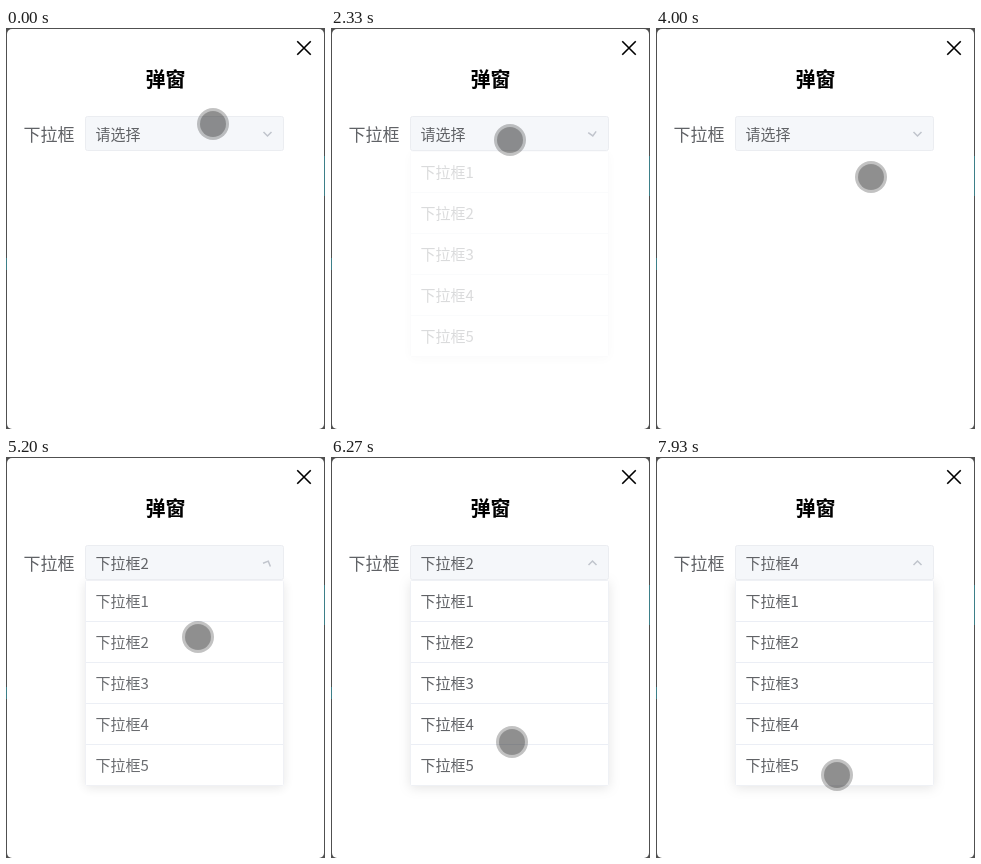
Animation of 319x401 px, one loop 8000 ms. Source, as an HTML page:

```html
<!DOCTYPE html>
<html lang="zh-CN">
<head>
<meta charset="utf-8">
<title>弹窗</title>
<style>
  html, body { margin: 0; width: 100%; height: 100%; overflow: hidden; background: #505050; }
  svg { display: block; width: 319px; height: 401px; }
  text { font: 15px "Noto Sans CJK SC", "Noto Sans CJK JP", "Noto Sans CJK", sans-serif; fill: #606266; }
  .title { font-size: 20px; font-weight: 700; fill: #000; text-anchor: middle; }
  .label { font-size: 17px; }
  #menu { opacity: 0; }
  .panel { fill: #fff; stroke: #eff1f5; filter: drop-shadow(0 2px 6px rgba(0, 0, 0, .1)); }
  .line { stroke: #ebeef5; }
</style>
</head>
<body>
<svg viewBox="0 0 319 401">
  <rect width="319" height="401" fill="#505050"/>
  <path d="M0 230h1v12h-1zM318 128h1v40h-1z" fill="#3d7f88"/>
  <rect x="1" y="1" width="317" height="400" rx="5" fill="#fff"/>
  <path d="M291.25 13.25l13.5 13.5m0-13.5l-13.5 13.5" stroke="#000" stroke-width="1.6"/>
  <text class="title" x="159.5" y="58.5">弹窗</text>
  <text class="label" x="17.5" y="113">下拉框</text>
  <g id="menu"><rect class="panel" x="79.5" y="123.5" width="198" height="205" rx="1"/></g>
  <rect x="79.5" y="88.5" width="198" height="34" rx="2" fill="#f5f7fa" stroke="#ebedf1"/>
  <text id="value" x="89.5" y="112">请选择</text>
  <path id="arrow" d="M257.5 108l4-4 4 4" fill="none" stroke="#c0c4cc" stroke-width="1.5"/>
  <g id="cursor">
    <circle r="16" fill="#000" fill-opacity=".24"/>
    <circle r="13" fill="#000" fill-opacity=".26"/>
  </g>
</svg>
<script>
const LOOP = 8000, FPS = 15, FADE = 300;
const $ = id => document.getElementById(id);
const value = $('value'), arrow = $('arrow'), menu = $('menu'), cursor = $('cursor');

// Each time the list is open, and the value picked as it closes
const spans = [
  { open: 820, close: 2100 },
  { open: 2820, close: 3695 },
  { open: 4380, close: 5180, pick: '下拉框2' },
  { open: 5880, close: 6710, pick: '下拉框4' },
  { open: 7550, close: LOOP }
];

// Pointer moves: start, end, x, y
const home = [207, 96];
const moves = [
  [200, 530, 205, 105],
  [1335, 1733, 70, 212],
  [2150, 2467, 188, 104],
  [2880, 3240, 240, 361],
  [3800, 4240, 210, 108],
  [4560, 4867, 192, 180],
  [5270, 5733, 189, 113],
  [5980, 6350, 181, 287],
  [6860, 7400, 189, 116],
  [7620, LOOP, 181, 319]
];

const progress = (t, from, to) => Math.min(1, Math.max(0, (t - from) / (to - from)));
const easeOut = (p, power) => 1 - (1 - p) ** power;

function addRow(i) {
  const y = 150 + 41 * i;
  const line = i < 4 ? `<path class="line" d="M80 ${y + 14.5}h197"/>` : '';
  menu.insertAdjacentHTML('beforeend', `<text x="89.5" y="${y}">下拉框${i + 1}</text>${line}`);
}
for (let i = 0; i < 5; i++) addRow(i);

function pointAt(t) {
  let [x, y] = home;
  for (const [from, to, toX, toY] of moves) {
    const k = easeOut(progress(t, from, to), 3);
    x += (toX - x) * k;
    y += (toY - y) * k;
  }
  return [x, y];
}

function draw(t) {
  let fade = 0, turn = 180, text = '请选择';
  for (const { open, close, pick } of spans) {
    const shown = progress(t, open, open + FADE);
    const hidden = progress(t, close, close + FADE);
    fade += shown - hidden;
    turn += 180 * (easeOut(hidden, 2) - easeOut(shown, 2));
    if (pick && t >= close) text = pick;
  }
  const [x, y] = pointAt(t).map(Math.round);
  menu.style.opacity = fade;
  arrow.setAttribute('transform', `rotate(${turn} 261.5 106)`);
  cursor.setAttribute('transform', `translate(${x} ${y})`);
  value.textContent = text;
}

const start = performance.now();
function tick(now) {
  const t = Math.max(0, now - start) % LOOP;
  draw(Math.floor(t * FPS / 1000 + .1) * 1000 / FPS);
  requestAnimationFrame(tick);
}
draw(0);
requestAnimationFrame(tick);
</script>
</body>
</html>
```
